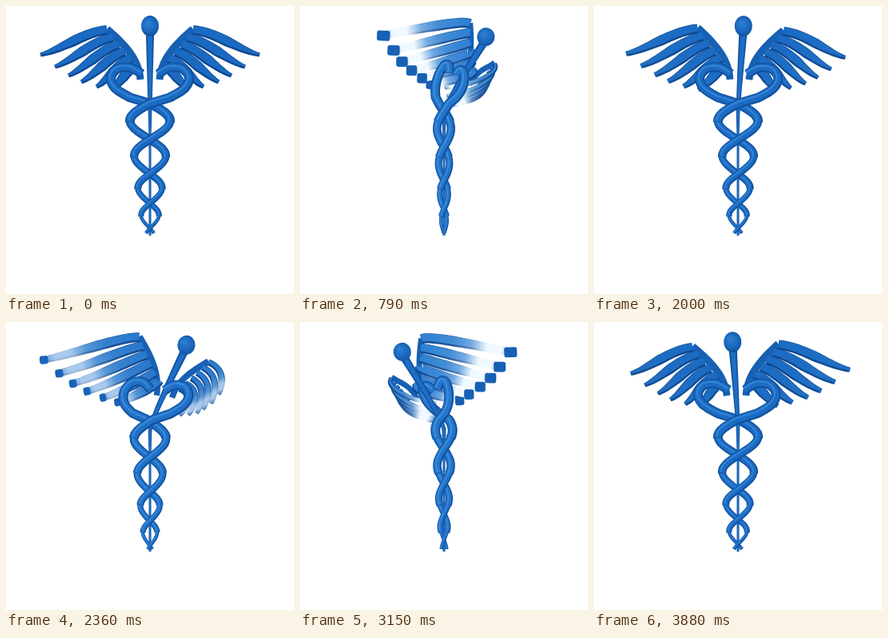
Animation of 360 by 360 pixels, one loop 3910 ms. Source, as an HTML page with a canvas:

```html
<!DOCTYPE html>
<html lang="en">
<head>
<meta charset="utf-8">
<title>Turning caduceus</title>
<style>
  html, body { margin: 0; width: 100%; height: 100%; overflow: hidden; background: #fff; }
  canvas { display: block; width: 360px; height: 360px; }
</style>
</head>
<body>
<canvas id="stage" width="360" height="360"></canvas>
<script>
const ctx = document.getElementById('stage').getContext('2d');
const LOOP = 3910, STEPS = 98, HALF = STEPS / 2, CX = 180;
const CROSS = [122, 167, 210, 247, 278];
const TIPS = [[137, 61, -40], [119, 76, -32], [102, 87, -26], [86, 95, -18], [67, 101, -10], [49, 105, -4]];
const FLARE = [[10, 85], [25, 77], [42, 79], [49, 91], [42, 104], [22, 116]];
const DEEP = [13, 72, 145], BASE = [27, 106, 194], MID = [62, 145, 222], PALE = [240, 249, 255];

let c, s, lean, open;

const mix = (a, b, t) => a + (b - a) * t;
const clamp = v => Math.max(0, Math.min(1, v));
const blend = (a, b, t) => `rgb(${a.map((v, i) => Math.round(mix(v, b[i], t)))})`;

// Turn about the upright axis; rise lifts near points and lowers far ones.
function turn(x, y, z, rise = 0) {
  const moved = z * c - x * s - z;
  return [CX + x * c + z * s, y - rise * moved];
}

function cubic(p, t) {
  const u = 1 - t, k = [u * u * u, 3 * u * u * t, 3 * u * t * t, t * t * t];
  return [0, 1].map(a => p.reduce((sum, q, i) => sum + q[a] * k[i], 0));
}

const curve = (p, n = 18) => Array.from({ length: n + 1 }, (_, k) => cubic(p, k / n));

function line(pts, width, color, dx = 0, dy = 0) {
  ctx.beginPath();
  pts.forEach(([x, y], i) => i ? ctx.lineTo(x + dx, y + dy) : ctx.moveTo(x + dx, y + dy));
  ctx.lineWidth = width;
  ctx.strokeStyle = color;
  ctx.stroke();
}

// Filled band of varying width along pts.
function ribbon(pts, widthAt, fill, dy = 0) {
  const left = [], right = [], n = pts.length - 1;
  pts.forEach(([x, y], i) => {
    const a = pts[Math.max(0, i - 1)], b = pts[Math.min(n, i + 1)];
    const dx = b[0] - a[0], dy = b[1] - a[1], d = Math.hypot(dx, dy) || 1;
    const w = widthAt(i / n) / 2;
    left.push([x + dy / d * w, y - dx / d * w]);
    right.unshift([x - dy / d * w, y + dx / d * w]);
  });
  ctx.beginPath();
  left.concat(right).forEach(([x, y], i) => i ? ctx.lineTo(x, y + dy) : ctx.moveTo(x, y + dy));
  ctx.closePath();
  ctx.fillStyle = fill;
  ctx.fill();
}

// Blue vane that bleaches out before the tip as the wing turns side-on.
function sheen([x0, y0], [x1, y1], color) {
  const g = ctx.createLinearGradient(x0, y0, x1, y1);
  const glare = clamp(open * 1.15 - 0.05);
  g.addColorStop(0, blend(color, PALE, 0));
  g.addColorStop(0.35, blend(color, PALE, glare * 0.1));
  g.addColorStop(0.55, blend(color, PALE, glare * 0.35));
  g.addColorStop(0.72, blend(color, PALE, glare));
  g.addColorStop(0.88, blend(color, PALE, glare));
  g.addColorStop(1, blend(color, PALE, glare * 0.4));
  return g;
}

function feather(side, i) {
  const [tx, ty, tz] = TIPS[i], near = side * s < 0;
  const sx = 54 - 7.5 * i, sy = 30 + 9 * i, sz = 50 - 2 * i;
  const reach = near ? 0.15 : 0.4;
  const at = (t, dy, dz) => turn(side * mix(sx, tx, t), mix(sy, ty, t) + dy, mix(sz, tz, t) + dz, mix(0.48, reach, t));
  const pts = curve([at(0, 0, 0), at(0.35, -8, 32), at(0.7, 4, 12), at(1, 0, 0)]);
  const body = near ? 13 : mix(13, 6, open), tip = near ? mix(6, 10, open) : 5;
  const width = t => t < 0.5 ? mix(body - 1, body, t * 2) : mix(body, tip, t * 2 - 1);
  ribbon(pts, width, sheen(pts[0], pts[18], DEEP));
  ribbon(pts, t => width(t) - 3, sheen(pts[0], pts[18], mixColor(BASE, MID, open * 0.6)), -1);
  if (near) cap(pts[15], pts[18], mix(1, 17 - i, open), tip + 3 * open);
}

const mixColor = (a, b, t) => a.map((v, i) => mix(v, b[i], t));

// Blunt feather end
function cap([bx, by], [x, y], length, height) {
  ctx.save();
  ctx.translate(x, y);
  ctx.rotate(Math.atan2(y - by, x - bx) - Math.sign(x - bx) * 0.25 * open);
  ctx.beginPath();
  ctx.roundRect(-length * 0.6, -height / 2, length, height, Math.min(3, length / 2));
  ctx.fillStyle = blend(BASE, DEEP, open * 0.3);
  ctx.fill();
  ctx.restore();
}

function wing(side) {
  const arm = curve([turn(side * 12, 92, 30, 0.2), turn(side * 14, 66, 40, 0.3),
                     turn(side * 32, 48, 46, 0.48), turn(side * 54, 29, 50, 0.48)]);
  ribbon(arm, t => mix(9, 10, t) * mix(1, 0.7, open), blend(DEEP, BASE, 0.7));
  for (let i = TIPS.length - 1; i >= 0; i--) feather(side, i);
}

function phase(y) {
  let i = 0;
  while (i < CROSS.length - 2 && y > CROSS[i + 1]) i++;
  return Math.PI * (i + (y - CROSS[i]) / (CROSS[i + 1] - CROSS[i]));
}

function coilPoint(side, y) {
  const p = phase(y), a = side * (27.6 - (y - 122) * 0.117);
  return turn(a * Math.sin(p), y, -0.24 * a * Math.cos(p));
}

function flarePoints(side) {
  const pts = [], last = FLARE.length - 1;
  for (let k = 0; k < last; k++) {
    const q = [-1, 0, 1, 2].map(d => FLARE[Math.max(0, Math.min(last, k + d))]);
    // Catmull-Rom
    const at = (a, t) => q[1][a] + 0.5 * t * (q[2][a] - q[0][a] + t * (2 * q[0][a] - 5 * q[1][a]
      + 4 * q[2][a] - q[3][a] + t * (3 * (q[1][a] - q[2][a]) + q[3][a] - q[0][a])));
    for (let t = 0; t < 1; t += 0.2) {
      const y = at(1, t), up = clamp((122 - y) / 45);
      const [px, py] = turn(-side * at(0, t), y, -side * 7 * (1 - up), 0.12 * up);
      pts.push([px + lean * 0.25 * up, py]);
    }
  }
  return pts;
}

// One strand from the middle of a loop to the middle of the next.
function coil(side, i) {
  const y = CROSS[i];
  const from = i ? (CROSS[i - 1] + y) / 2 - 0.6 : y;
  const to = i < 4 ? (CROSS[i + 1] + y) / 2 + 0.6 : 284;
  const pts = i ? [] : flarePoints(side);
  for (let k = 0; k <= 18; k++) pts.push(coilPoint(side, mix(from, to, k / 18)));
  const w = [12, 10.5, 9, 7.2, 4.4][i];
  line(pts, w, blend(DEEP, BASE, 0.3));
  line(pts, w * 0.7, blend(BASE, MID, open * 0.3), -0.4, -0.5);
  line(pts, w * 0.16, blend(BASE, MID, 0.7 + open * 0.3), -w * 0.12, -w * 0.16);
}

function rod() {
  const top = 28 + 19 * (1 - c);
  const pts = Array.from({ length: 30 }, (_, k) => {
    const y = mix(top, 287, k / 29);
    return [CX + lean * Math.pow(clamp((132 - y) / (132 - top)), 1.1), y];
  });
  const width = t => mix(10.5, 3, Math.min(1, t * 1.9));
  ribbon(pts, width, blend(DEEP, BASE, 0.3));
  ribbon(pts, t => width(t) * 0.6, blend(BASE, MID, 0.1));
}

function head() {
  const x = CX + lean, y = 25 + 19 * (1 - c);
  const g = ctx.createRadialGradient(x - 3, y - 4, 1, x, y, 14);
  g.addColorStop(0, blend(BASE, MID, 0.5));
  g.addColorStop(0.6, blend(BASE, DEEP, 0.1));
  g.addColorStop(1, blend(DEEP, BASE, 0.1));
  ctx.beginPath();
  ctx.ellipse(x, y, 11, 13 - 1.5 * open, lean / 400, 0, 7);
  ctx.fillStyle = g;
  ctx.fill();
}

function draw(time) {
  const step = Math.floor(time % LOOP * STEPS / LOOP + 0.3) % HALF;
  const turned = (step > HALF / 2 ? step - HALF : step) / HALF * Math.PI;
  c = Math.cos(turned);
  s = Math.sin(turned);
  open = Math.abs(s);
  lean = 53 * Math.tanh(turned / 0.5);

  ctx.fillStyle = '#fff';
  ctx.fillRect(0, 0, 360, 360);
  ctx.lineJoin = 'round';
  const far = s < 0 ? -1 : 1, front = i => i % 2 ? 1 : -1;
  wing(far);
  wing(-far);
  for (let i = 4; i >= 0; i--) coil(-front(i), i);
  rod();
  for (let i = 4; i >= 0; i--) coil(front(i), i);
  head();
}

const start = performance.now();
function tick() {
  draw(performance.now() - start);
  requestAnimationFrame(tick);
}
tick();
</script>
</body>
</html>
```
